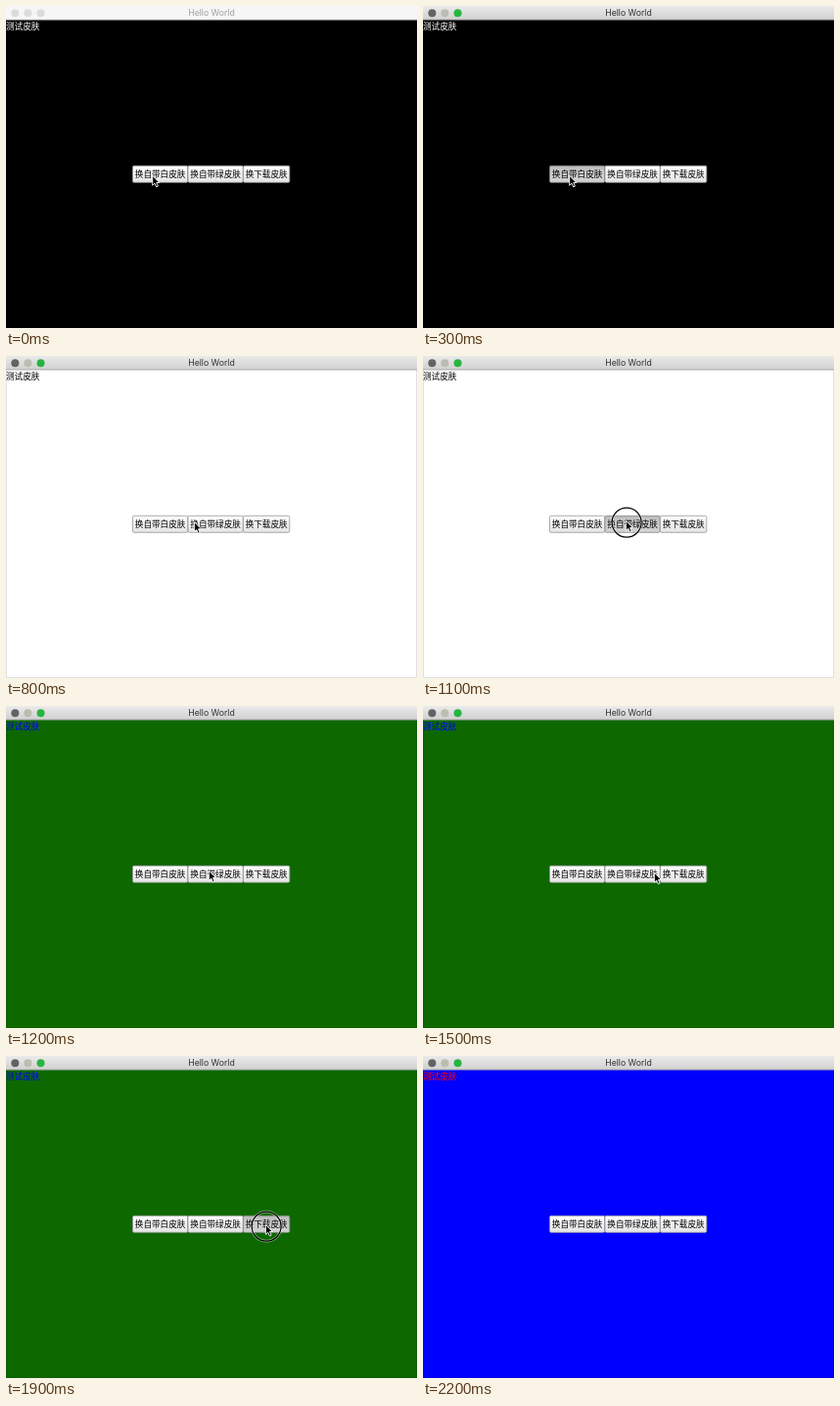
Animation of 420x329 px, one loop 2.3 s. Source, as an HTML page:

```html
<!DOCTYPE html>
<html lang="zh">
<head>
<meta charset="utf-8">
<style>
  html, body { margin: 0; width: 100%; height: 100%; overflow: hidden; }
  svg { display: block; width: 420px; height: 329px; }
  text { font: 8.6px "Noto Sans CJK SC", "Noto Sans CJK", sans-serif; }
  #title { font: 8.7px Inter, sans-serif; text-anchor: middle; }
  .button text { text-anchor: middle; }
  .button rect { fill: url(#raised); stroke: #999; stroke-width: .8; }
  .button.down rect { fill: url(#sunken); stroke: #888; }
</style>
</head>
<body>
<svg viewBox="0 0 420 329">
  <defs>
    <linearGradient id="raised" x2="0" y2="1"><stop stop-color="#fff"/><stop offset="1" stop-color="#e4e4e4"/></linearGradient>
    <linearGradient id="sunken" x2="0" y2="1"><stop stop-color="#b8b8b8"/><stop offset=".3" stop-color="#c8c8c8"/><stop offset="1" stop-color="#d2d2d2"/></linearGradient>
    <linearGradient id="active" x2="0" y2="1"><stop stop-color="#eaeaea"/><stop offset="1" stop-color="#d0d0d0"/></linearGradient>
  </defs>
  <rect id="page" width="420" height="329"/>
  <path d="M.5 14V328.5H419.5V14" fill="none" stroke="#000" stroke-opacity=".12"/>
  <rect id="bar" width="420" height="14"/>
  <path id="edge" d="M0 14H420" stroke-width="1"/>
  <g id="lights"><circle cx="9.3" cy="7.2" r="4"/><circle cx="22.3" cy="7.2" r="4"/><circle cx="35.5" cy="7.2" r="4"/></g>
  <text id="title" x="210" y="10.4">Hello World</text>
  <text id="label" x="0" y="23.8">测试皮肤</text>
  <g id="buttons"></g>
  <g id="pointer">
    <g id="ring" fill="none">
      <circle cx=".7" cy="1.8" r="15" stroke="#fff" stroke-opacity=".5" stroke-width="2.8"/>
      <circle cx=".7" cy="1.8" r="15" stroke="#000" stroke-width="1.2"/>
    </g>
    <path d="M0 0V10L2.3 7.9L4 11.6L5.7 10.8L4.1 7.2H7.1Z" stroke="#fff" stroke-width=".9" stroke-linejoin="round"/>
  </g>
</svg>
<script>
const $ = id => document.getElementById(id);
const LOOP = 2300, STEP = 100;

// Each skin: start time, page colour, label colour
const skins = [
  [0, "#000", "#fff"],
  [400, "#fff", "#000"],
  [1200, "#0d6800", "#00f"],
  [2000, "#00f", "#f00"]
];
// Pointer path: time, x, y
const path = [[0, 149.7, 173.3], [400, 149.7, 173.3], [1000, 207.4, 168.3],
  [1200, 207.4, 168.3], [1800, 265.4, 172.3], [2000, 265.4, 172.3], [2100, 274, 180]];
const rings = [[100, 300], [1000, 1200], [1800, 2000]];
const presses = [[200, 400], [1100, 1200], [1900, 2000]];

$("buttons").innerHTML = [
  ["换自带白皮肤", 129.5, 56.2],
  ["换自带绿皮肤", 186, 56.2],
  ["换下载皮肤", 242.5, 47.3]
].map(([name, x, w]) => `<g class="button">
  <rect x="${x}" y="163.3" width="${w}" height="17" rx="1.4"/>
  <text x="${x + w / 2}" y="174.7">${name}</text></g>`).join("");

const within = (t, [from, to]) => t >= from && t < to;
const last = (list, t) => list.findLastIndex(item => item[0] <= t);

function pointerAt(t) {
  const i = last(path, t), a = path[i], b = path[i + 1] || a;
  const p = b === a ? 0 : (t - a[0]) / (b[0] - a[0]);
  const ease = p * p * (3 - 2 * p);
  return [1, 2].map(k => a[k] + (b[k] - a[k]) * ease);
}

function draw(t) {
  const [, page, ink] = skins[last(skins, t)];
  const active = t >= 200;
  $("page").style.fill = page;
  $("label").style.fill = ink;
  $("bar").style.fill = active ? "url(#active)" : "#f6f6f6";
  $("edge").style.stroke = active ? "#aaa" : "#d0d0d0";
  $("title").style.fill = active ? "#303030" : "#a0a0a0";
  const colours = active ? ["#636363", "#bcbcb0", "#27b541"] : ["#dcdcdc", "#dcdcdc", "#dcdcdc"];
  [...$("lights").children].forEach((light, i) => light.style.fill = colours[i]);
  [...$("buttons").children].forEach((button, i) =>
    button.classList.toggle("down", within(t, presses[i])));
  $("pointer").setAttribute("transform", `translate(${pointerAt(t)})`);
  $("pointer").style.display = t < 2200 ? "" : "none";
  $("ring").style.display = rings.some(span => within(t, span)) ? "" : "none";
}

const start = performance.now();
function tick() {
  const t = (performance.now() - start) % LOOP;
  draw(Math.floor(t / STEP) * STEP);
  requestAnimationFrame(tick);
}
tick();
</script>
</body>
</html>
```
